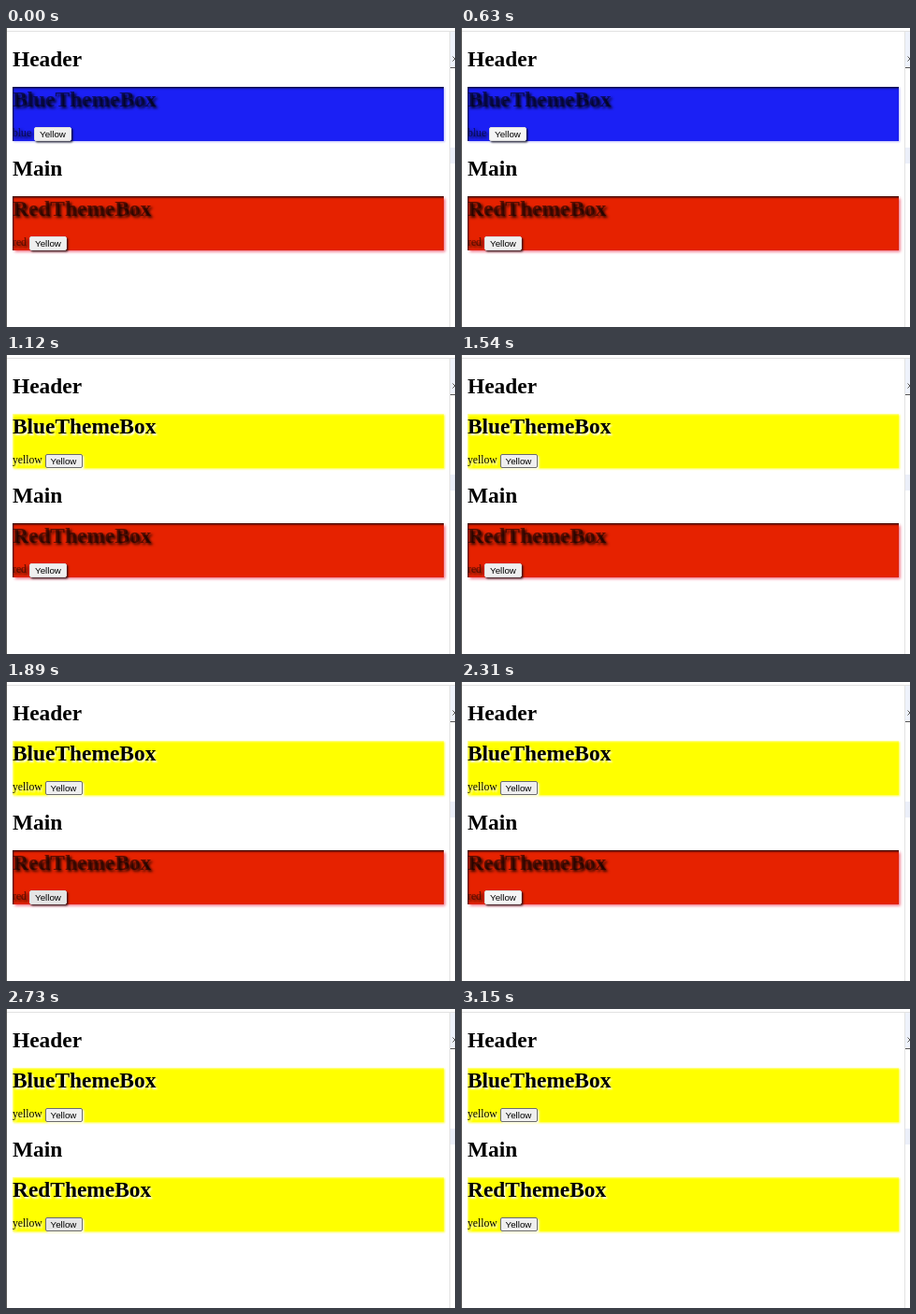
Animation, 480 px wide and 320 px high, one loop 3220 ms. Source, as an HTML page:

```html
<!DOCTYPE html>
<html lang="en">
<head>
<meta charset="utf-8">
<title>Theme boxes</title>
<style>
html, body { margin: 0; width: 100%; height: 100%; overflow: hidden; background: #fff; }
body { position: relative; font: 11.7px/14px "Liberation Serif", serif; color: #000; }
body * { position: absolute; box-sizing: border-box; margin: 0; white-space: nowrap; }
h1 { left: 7px; font-size: 23.4px; line-height: 26px; }
.box { left: 7px; width: 461px; height: 58px; }
.box h1 { left: 0; top: 0; }
.box span { left: 0; top: 43px; }
.box button {
  top: 43px; width: 40px; height: 15px; padding: 0;
  border: 1px solid #6b6b6b; border-radius: 2px; color: #000;
  font: 9.75px/13px "Liberation Sans", Arial, sans-serif;
}
.dark { color: rgba(0, 0, 0, .55); text-shadow: 2px 2px 3px rgba(0, 0, 0, .85); }
.dark button { border-color: #ddd; box-shadow: 1.5px 1.5px 2px #000b; text-shadow: none; }
.blue { background: #1b20f5; box-shadow: inset 1px 1.5px 2px #000c, 1px 1px 2px #bcbcff; }
.red { background: #e62200; box-shadow: inset 1px 1.5px 2px #000c, 1.5px 1.5px 3px #f06a80; }
.yellow { background: #ff0; text-shadow: 1.5px 1.5px 2px #fff; box-shadow: inset 1px 1px 2px #ffffa0, 1px 1px 2px #ffff30; }
.yellow button { box-shadow: 1.5px 1.5px 2px #fff; text-shadow: none; }
.edge { background: #e2e2e2; }
</style>
</head>
<body>
<div class="edge" style="left:0;top:3px;width:480px;height:1px"></div>
<div style="left:0;top:0;width:1px;height:320px;background:#555"></div>
<div class="edge" style="left:474px;top:3px;width:1px;height:317px"></div>
<div style="left:475px;top:4px;width:5px;height:38px;background:#eef2fb"></div>
<div style="left:475px;top:42px;width:5px;height:1px;background:#555"></div>
<div style="left:475px;top:128px;width:5px;height:17px;background:#ebeff9"></div>
<svg style="left:476px;top:29px" width="4" height="8"><path d="M1.5 1.5 4 4 1.5 6.5" fill="none" stroke="#555"/></svg>

<h1 style="top:20px">Header</h1>
<div id="top" style="top:63px"><h1>BlueThemeBox</h1><span></span><button>Yellow</button></div>
<h1 style="top:137px">Main</h1>
<div id="low" style="top:180px"><h1>RedThemeBox</h1><span></span><button>Yellow</button></div>

<script>
const LOOP = 3220, IDLE = "#efefef", HOVER = "#e5e5e5", DOWN = "#f5f5f5";

// Times at which the pointer enters, presses, releases and leaves each button.
const boxes = [
  { id: "top", theme: "blue", x: 23, enter: 420, press: 560, release: 700, leave: 1050 },
  { id: "low", theme: "red", x: 18, enter: 1680, press: 2240, release: 2380, leave: 2800 }
];

function show(box, t) {
  const el = document.getElementById(box.id);
  const [, label, button] = el.children;
  const clicked = t >= box.release;
  const theme = clicked ? "yellow" : box.theme;
  el.className = "box " + theme + (clicked ? "" : " dark");
  label.textContent = theme;
  button.style.left = (clicked ? 34.5 : box.x) + "px";
  button.style.background =
    t < box.enter || t >= box.leave ? IDLE :
    t >= box.press && !clicked ? DOWN : HOVER;
}

let start;
function frame(now) {
  start ??= now;
  const t = (now - start) % LOOP;
  boxes.forEach(box => show(box, t));
  requestAnimationFrame(frame);
}
boxes.forEach(box => show(box, 0));
requestAnimationFrame(frame);
</script>
</body>
</html>
```
